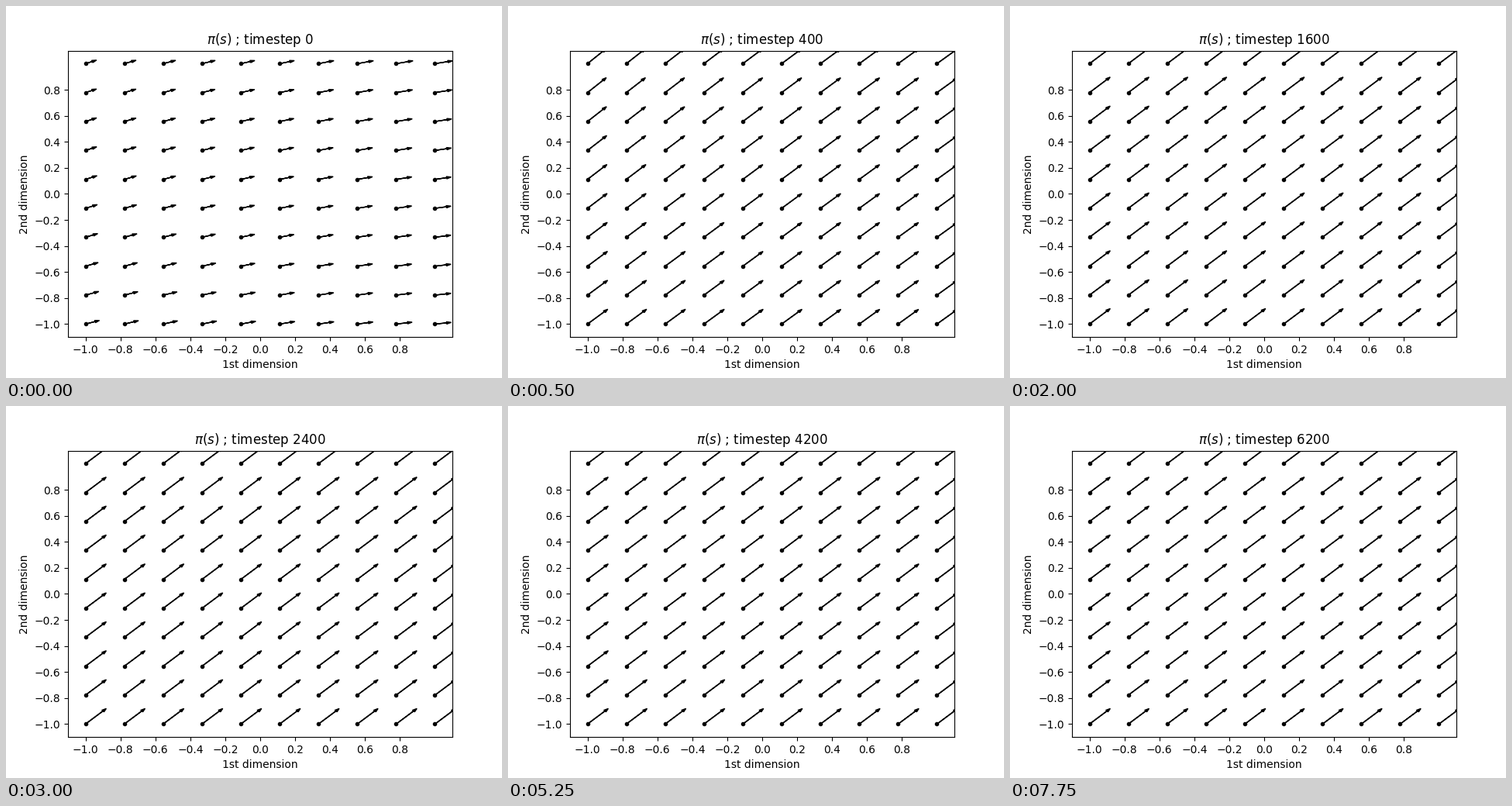
Write a matplotlib script that moves like this. It is 640 by 480 pixels and loops after 8 s.

```python
import numpy as np
import matplotlib.pyplot as plt
from matplotlib.animation import FuncAnimation

FRAMES = 32
INTERVAL = 250
STEPS_PER_FRAME = 200
MAX_ACTION = 0.1
SETTLED = 10  # the policy no longer changes after this many updates

grid = np.linspace(-1, 1, 10)
X, Y = (a.ravel() for a in np.meshgrid(grid, grid))

# Untrained policy: smooth functions of the state.
START_DX = 0.054 + 0.012 * X - 0.002 * Y + 0.006 * X * Y + 0.0045 * Y**2
START_DY = 0.0151 - 0.0026 * X + 0.0011 * Y + 0.0024 * X * Y
LAG = (1 - X) * (1 + Y) / 4  # the upper left learns more slowly


def policy(frame):
    """Actions that saturate through tanh towards (0.1, 0.1)."""
    t = min(frame, SETTLED)
    growth = np.log(1 + t)
    gain_x = 1.33 * growth - 0.4 * LAG * t * np.exp(-t / 4)
    gain_y = 1.5 * growth
    dx = np.tanh(np.arctanh(START_DX / MAX_ACTION) + gain_x)
    dy = np.tanh(np.arctanh(START_DY / MAX_ACTION) + gain_y)
    return MAX_ACTION * dx, MAX_ACTION * dy


fig, ax = plt.subplots(figsize=(6.4, 4.8), dpi=100)
ax.plot(X, Y, "k.")
arrows = [
    ax.arrow(x, y, dx, dy, width=0.001, head_width=0.018,
             head_length=0.027, color="black")
    for x, y, dx, dy in zip(X, Y, *policy(0))
]
ax.set(xlim=(-1.1, 1.1), ylim=(-1.1, 1.1),
       xlabel="1st dimension", ylabel="2nd dimension")
ticks = np.linspace(-1, 0.8, 10)
ax.set_xticks(ticks)
ax.set_yticks(ticks)
title = ax.set_title("")


def update(frame):
    for arrow, dx, dy in zip(arrows, *policy(frame)):
        arrow.set_data(dx=dx, dy=dy)
    title.set_text(rf"$\pi(s)$ ; timestep {frame * STEPS_PER_FRAME}")
    return [*arrows, title]


anim = FuncAnimation(fig, update, frames=FRAMES, interval=INTERVAL,
                     repeat=True, repeat_delay=0, blit=False)
plt.show()
```
